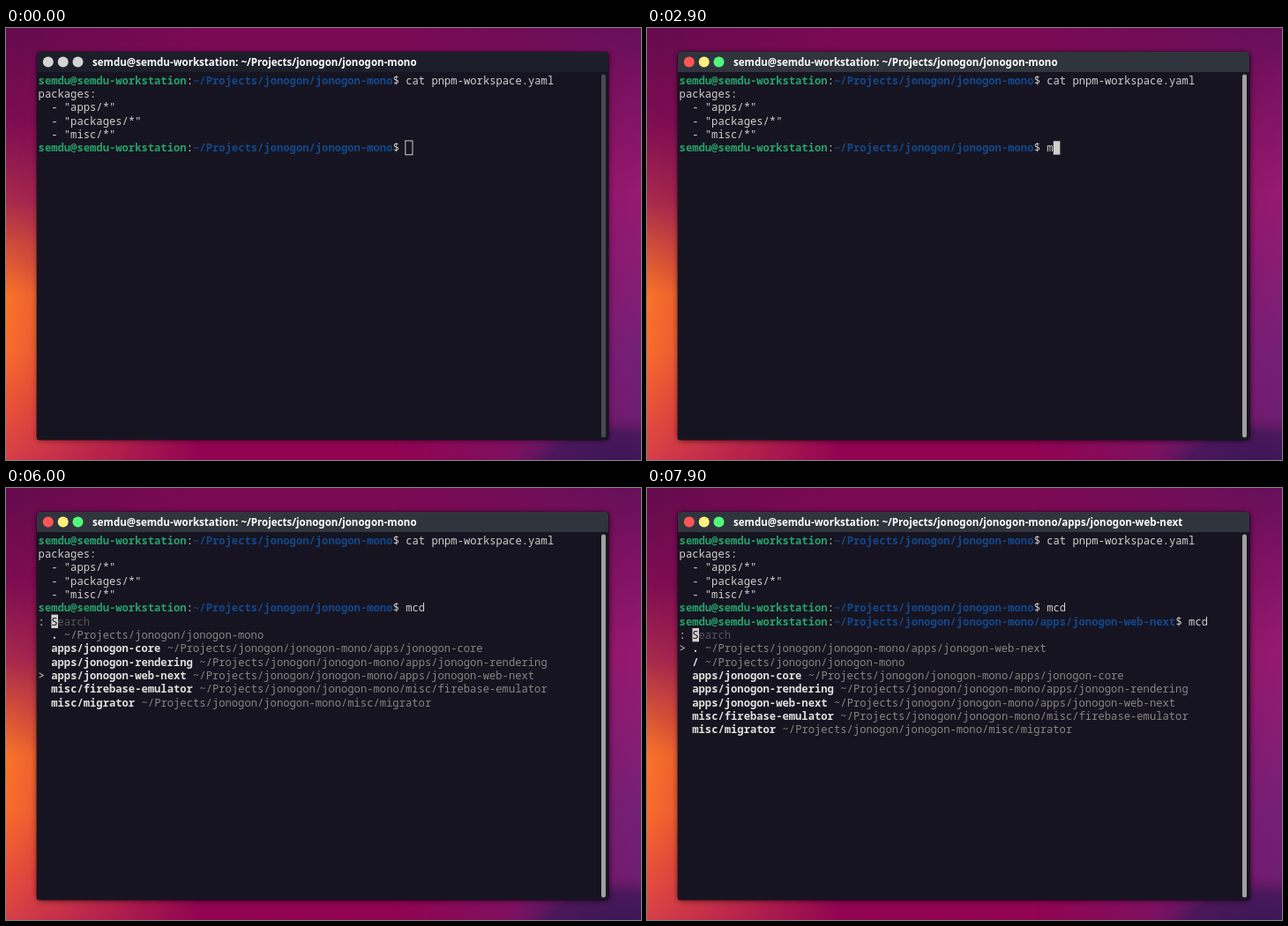
Write an HTML page that moves like this. It is 720x490 px and loops after 8 s.

```html
<!DOCTYPE html>
<html lang="en">
<head>
<meta charset="utf-8">
<title>Terminal</title>
<style>
  html, body { margin: 0; width: 100%; height: 100%; overflow: hidden; background: #8a0756; }
  svg { display: block; width: 720px; height: 490px; }
  text { white-space: pre; }
  #title { font: 700 11.55px "Noto Sans", "Open Sans", sans-serif; fill: #fff; }
  #screen text { font: 400 12.18px "Noto Sans Mono", "DejaVu Sans Mono", monospace; fill: #d0cfcc; }
  #screen .user { font-weight: 700; fill: #26a269; }
  #screen .path { font-weight: 700; fill: #12488b; }
  #screen .bold { font-weight: 700; fill: #dededb; }
  #screen .dim { fill: #868583; }
  #screen .hint { fill: #56545c; }
  #screen .inverse { fill: #171421; }
</style>
</head>
<body>
<svg viewBox="0 0 720 490" xmlns="http://www.w3.org/2000/svg">
  <defs>
    <linearGradient id="base" x2="0" y2="1">
      <stop offset="0" stop-color="#7a0a54"/>
      <stop offset="1" stop-color="#920452"/>
    </linearGradient>
    <linearGradient id="sunset" x2="0" y2="1">
      <stop offset="0" stop-color="#640b4e"/>
      <stop offset=".22" stop-color="#7e0d52"/>
      <stop offset=".4" stop-color="#a82a4c"/>
      <stop offset=".5" stop-color="#d04d3a"/>
      <stop offset=".62" stop-color="#fb7328"/>
      <stop offset=".75" stop-color="#fa6c2c"/>
      <stop offset=".88" stop-color="#ea5238"/>
      <stop offset="1" stop-color="#d63f48"/>
    </linearGradient>
    <linearGradient id="dusk" x2="0" y2="1">
      <stop offset="0" stop-color="#66105a"/>
      <stop offset=".15" stop-color="#7c1263"/>
      <stop offset=".38" stop-color="#951a70"/>
      <stop offset=".55" stop-color="#881d74"/>
      <stop offset=".75" stop-color="#742077"/>
      <stop offset="1" stop-color="#6a1d70"/>
    </linearGradient>
    <linearGradient id="fadeRight">
      <stop offset="0" stop-color="#fff"/>
      <stop offset="1" stop-color="#000"/>
    </linearGradient>
    <linearGradient id="fadeLeft">
      <stop offset="0" stop-color="#000"/>
      <stop offset="1" stop-color="#fff"/>
    </linearGradient>
    <mask id="leftSide"><rect width="220" height="490" fill="url(#fadeRight)"/></mask>
    <mask id="rightSide"><rect x="440" width="280" height="490" fill="url(#fadeLeft)"/></mask>
    <radialGradient id="violet">
      <stop offset="0" stop-color="#3c1656"/>
      <stop offset=".6" stop-color="#431758" stop-opacity=".85"/>
      <stop offset="1" stop-color="#6a1862" stop-opacity="0"/>
    </radialGradient>
    <filter id="blur" x="-10%" y="-10%" width="120%" height="120%">
      <feGaussianBlur stdDeviation="3"/>
    </filter>
  </defs>

  <rect width="720" height="490" fill="url(#base)"/>
  <rect width="220" height="490" fill="url(#sunset)" mask="url(#leftSide)"/>
  <rect x="440" width="280" height="490" fill="url(#dusk)" mask="url(#rightSide)"/>
  <ellipse cx="695" cy="492" rx="130" ry="54" fill="url(#violet)"/>

  <rect id="shadow" x="35" y="28" width="649" height="440" rx="4" filter="url(#blur)"/>
  <rect x="34.8" y="27" width="648.6" height="440.6" rx="4" fill="none" stroke="#000" stroke-opacity=".4"/>
  <path id="bar" d="M35 51V31a4 4 0 0 1 4-4H679a4 4 0 0 1 4 4V51Z"/>
  <rect x="35" y="50" width="648" height="417" fill="#171421"/>
  <g id="buttons">
    <circle cx="47.8" cy="38.5" r="6"/>
    <circle cx="64.7" cy="38.5" r="6"/>
    <circle cx="81.5" cy="38.5" r="6"/>
  </g>
  <text id="title" x="98" y="43"></text>
  <rect id="scroll" x="675" y="52.5" width="5" height="412" rx="2.5"/>
  <g id="screen"></g>
  <path id="pointer" d="M-3 -5.5H-1L0 -4.8L1 -5.5H3M0 -4.8V4.8M-3 5.5H-1L0 4.8L1 5.5H3"
        fill="none" stroke="#f2f2f2" stroke-width="1.3"/>
</svg>

<script>
const LOOP = 8000;
const LEFT = 36.6, TOP = 51.5, COL = 7.31, ROW = 15.35, BASE = 12;
const FG = "#d0cfcc";
const USER = "semdu@semdu-workstation";
const ROOT = "~/Projects/jonogon/jonogon-mono";
const DIRS = ["apps/jonogon-core", "apps/jonogon-rendering", "apps/jonogon-web-next",
              "misc/firebase-emulator", "misc/migrator"];
const NEXT = ROOT + "/" + DIRS[2];
const INTRO = ["packages:", '  - "apps/*"', '  - "packages/*"', '  - "misc/*"'];
const dirItems = DIRS.map(d => [d, ROOT + "/" + d]);

const $ = id => document.getElementById(id);
const clamp = v => Math.max(0, Math.min(1, v));

function mix(a, b, k) {
  const rgb = a.map((v, i) => Math.round(v + (b[i] - v) * k));
  return `rgb(${rgb})`;
}

function put(row, col, str, cls = "") {
  return `<text class="${cls}" x="${LEFT + col * COL}" y="${TOP + row * ROW + BASE}">` +
         str.replace(/>/g, "&gt;") + "</text>";
}

function caret(row, col, hollow) {
  const x = LEFT + col * COL, y = TOP + row * ROW;
  return hollow
    ? `<rect x="${x - .4}" y="${y - .3}" width="8.1" height="15.8" fill="none" stroke="${FG}"/>`
    : `<rect x="${x + .2}" y="${y}" width="7.6" height="15.4" fill="${FG}"/>`;
}

function prompt(row, dir, command) {
  const start = USER.length + 1, end = start + dir.length;
  return put(row, 0, USER, "user") + put(row, start - 1, ":") +
         put(row, start, dir, "path") + put(row, end, "$ " + command);
}

function menu(row, items, selected) {
  let out = put(row, 0, ":") + caret(row, 2) +
            put(row, 2, "S", "inverse") + put(row, 3, "earch", "hint");
  items.forEach(([name, path], i) => {
    const r = row + 1 + i;
    if (i === selected) out += put(r, 0, ">");
    out += put(r, 2, name, "bold") + put(r, 3 + name.length, path, "dim");
  });
  return out;
}

// A prompt line at rest, being typed into, or just submitted.
function entry(row, dir, start, t, cursor) {
  const typed = "mcd".slice(0, Math.max(0, Math.floor((t - start) / 100) + 1));
  const col = USER.length + dir.length + 3 + typed.length;
  const out = prompt(row, dir, typed);
  if (typed.length === 3) return out + caret(row + 1, 0);
  if (typed) return out + caret(row, col);
  return cursor === "off" ? out : out + caret(row, col, cursor === "hollow");
}

function screen(t) {
  let out = prompt(0, ROOT, "cat pnpm-workspace.yaml");
  INTRO.forEach((line, i) => out += put(i + 1, 0, line));

  if (t < 3200) {
    const blink = (t >= 1600 && t < 2200) || t >= 2800;
    return out + entry(5, ROOT, 2900, t, t < 1200 ? "hollow" : blink ? "off" : "on");
  }
  out += prompt(5, ROOT, "mcd");
  if (t < 6600) {
    const down = [4000, 4200, 4300, 4400].filter(k => t >= k).length;
    return out + menu(6, [[".", ROOT], ...dirItems], t < 6000 ? down : 3);
  }
  if (t < 7900) return out + entry(6, NEXT, 7600, t, t < 7200 ? "on" : "off");
  return out + prompt(6, NEXT, "mcd") + menu(7, [[".", NEXT], ["/", ROOT], ...dirItems], 0);
}

function drawWindow(t) {
  const focus = clamp((t - 1200) / 200);
  const lights = [[255, 85, 85], [254, 240, 125], [80, 250, 123]];
  $("bar").setAttribute("fill", mix([28, 31, 41], [48, 53, 61], focus));
  $("scroll").setAttribute("fill", mix([75, 73, 79], [160, 159, 158], focus));
  $("shadow").setAttribute("opacity", .4 + .2 * focus);
  [...$("buttons").children].forEach((dot, i) =>
    dot.setAttribute("fill", mix([212, 212, 212], lights[i], focus)));
  $("title").textContent = `${USER}: ${t < 6600 ? ROOT : NEXT}`;
}

function drawPointer(t) {
  const k = 1 - Math.pow(1 - clamp((t - 700) / 300), 2);
  const x = 500 + (417 - 500) * k, y = 500 + (170 - 500) * k;
  $("pointer").setAttribute("transform", `translate(${x} ${y})`);
  $("pointer").setAttribute("visibility", t >= 700 && t < 2900 ? "visible" : "hidden");
}

let last = -1;
function frame(now) {
  const t = Math.floor((now % LOOP) / 100) * 100;
  if (t !== last) {
    last = t;
    drawWindow(t);
    drawPointer(t);
    $("screen").innerHTML = screen(t);
  }
  requestAnimationFrame(frame);
}
frame(0);
</script>
</body>
</html>
```
